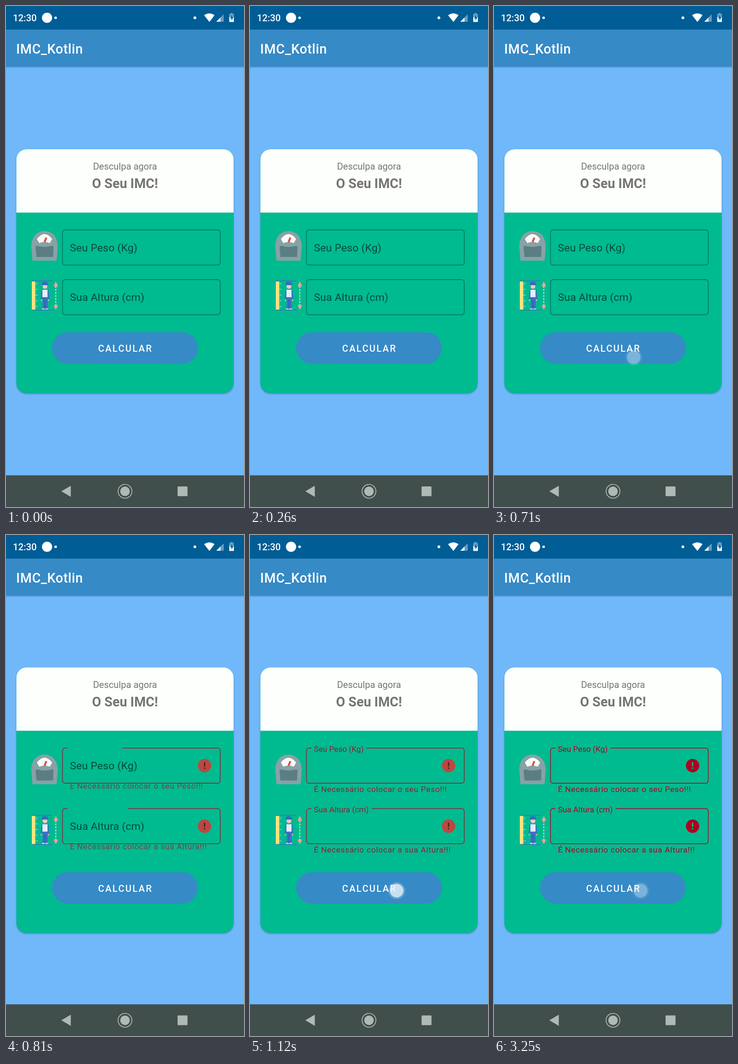
Animation, 516 px wide and 1084 px high, one loop 3350 ms. Source, as an HTML page:

```html
<!DOCTYPE html>
<html lang="pt">
<head>
<meta charset="utf-8">
<title>IMC_Kotlin</title>
<style>
  html, body { margin: 0; width: 100%; height: 100%; overflow: hidden; background: #70b8fa; }
  svg { display: block; --error: #b00020; --badge: #b00020; --mark: #00ba90; }
  svg.muted { --error: #8f2032; --badge: #bd473e; --mark: #57202a; }
  text { font-family: Roboto, sans-serif; }
  .medium { font-weight: 500; fill: #fff; }
  .body { font-size: 22.93px; letter-spacing: .2px; fill: #044a3a; }
  .small { font-size: 17.2px; fill: var(--error); }
  .caption { letter-spacing: .75px; }
  .outline { fill: none; stroke: #007158; stroke-width: 1.4; }
  .wrong .outline { stroke: var(--error); }
  #card { filter: drop-shadow(0 2px 1.5px rgba(0, 30, 60, .3)); }
</style>
</head>
<body>
<svg id="stage" width="516" height="1084" viewBox="0 0 516 1084">
  <defs>
    <linearGradient id="shade" x2="0" y2="1">
      <stop stop-color="#2d6291" stop-opacity=".45"/>
      <stop offset="1" stop-color="#2d6291" stop-opacity="0"/>
    </linearGradient>
    <radialGradient id="halo">
      <stop offset=".7" stop-color="#fff" stop-opacity=".35"/>
      <stop offset="1" stop-color="#fff" stop-opacity="0"/>
    </radialGradient>
    <clipPath id="below"><rect x="122" y="77" width="343" height="30"/></clipPath>
  </defs>

  <rect width="516" height="1084" fill="#70b8fa"/>
  <rect y="131" width="516" height="4" fill="url(#shade)"/>
  <rect y="50" width="516" height="81" fill="#368ac6"/>
  <rect width="516" height="51" fill="#005d96"/>
  <text class="medium" x="15" y="33" font-size="20.3">12:30</text>
  <text class="medium" x="22" y="103" font-size="28.67" letter-spacing=".6">IMC_Kotlin</text>
  <g fill="#fff">
    <circle cx="89" cy="25.5" r="11"/>
    <circle cx="107.5" cy="25.5" r="2.8"/>
    <circle cx="409.5" cy="25.5" r="3"/>
    <path d="M429.500 20Q441 12 452 20L441 34.500Z"/>
    <path d="M456 34L472 18V34Z" opacity=".4"/>
    <path d="M456 34L465 25V34Z"/>
    <path d="M484 17H487V15H491V17H494V25H484Z" opacity=".4"/>
    <path d="M484 24H494V34.500H484Z"/>
    <path d="M490 19L486 27H489V32L493 24H490Z" fill="#005d96"/>
  </g>

  <g id="card">
    <rect id="panel" x="22.500" width="471" rx="22" fill="#00ba90"/>
    <g class="up">
      <path d="M22.500 447V332a22 22 0 0 1 22-22h427a22 22 0 0 1 22 22V447Z" fill="#fcfffb"/>
    </g>
  </g>
  <g class="up" text-anchor="middle" fill="#757575">
    <text x="258" y="354" font-size="20.07">Desculpa agora</text>
    <text x="258" y="394" font-size="28.67" font-weight="700">O Seu IMC!</text>
  </g>

  <g id="scale">
    <path d="M59 551Q57 551 57 548L55 520C55 499 67 487 83.500 487S112 499 112 520L110 548Q110 551 108 551Z" fill="#87a2a6"/>
    <path d="M67 504Q83.500 483 100 504L95 513Q83.500 508 72 513Z" fill="#fafafa"/>
    <path d="M83.500 511L87.500 501" stroke="#e4483c" stroke-width="4"/>
    <path d="M64 521Q66 518 70 519.500Q83.500 523 97 519.500Q103 518 103 522L102 543H66Z" fill="#5a7e83"/>
  </g>

  <g id="ruler">
    <path d="M55.500 594.800H101M57 657.800H101" stroke="#456fb8" stroke-width="1.600"/>
    <rect x="56" y="596" width="7.500" height="61" fill="#fbe47e"/>
    <path d="M66 600V655" stroke="#91bbe6" stroke-width="5" stroke-dasharray="1.800 10.500"/>
    <path d="M77 615Q84 611 92 615L94 635H90L91 655H79L80 635H75Z" fill="#3d71c4"/>
    <path d="M84.500 635V655" stroke="#23539d"/>
    <path d="M79 614H90V630H79Z" fill="#e3eefa"/>
    <path d="M75.500 635H78V638H75.500ZM91 635H93.500V638H91Z" fill="#f4bdb0"/>
    <circle cx="84.500" cy="606.500" r="5.200" fill="#f4c9be"/>
    <path d="M77.500 604Q76 596 84 596.500Q92 596 91.500 604Z" fill="#376ac0"/>
    <path d="M78 655.500H84M85.500 655.500H91.500" stroke="#dbe5f1" stroke-width="2"/>
    <path d="M108 606V648" stroke="#f3d0c3" stroke-width="2" stroke-dasharray="4 2.500"/>
    <path d="M104 604L108 596L112 604V607H104ZM104 647H112V650L108 657L104 650Z" fill="#f3a096"/>
  </g>

  <g id="fields"></g>

  <g class="down">
    <rect x="100" y="706" width="316" height="68" rx="34" fill="#368ac6"/>
    <text class="medium" x="199.800" y="748" font-size="20.07" letter-spacing="2.300">CALCULAR</text>
  </g>
  <g id="touch">
    <circle r="20" fill="url(#halo)"/>
    <circle r="14.500" fill="#e4f1f8" opacity=".72"/>
  </g>

  <rect y="1015.500" width="516" height="69" fill="#414f4c"/>
  <g fill="#afbab5">
    <path d="M120 1050L140.500 1038V1062Z"/>
    <circle cx="258" cy="1050" r="10.300"/>
    <circle cx="258" cy="1050" r="15" fill="none" stroke="#afbab5" stroke-width="1.700"/>
    <rect x="372" y="1039.500" width="21.500" height="21" rx="1.500"/>
  </g>
</svg>
<script>
const LOOP = 3350, SHIFT = 23.5;
const $ = id => document.getElementById(id);
const all = selector => document.querySelectorAll(selector);

const field = (id, label, gapEnd, message) => `
  <g id="${id}">
    <rect class="outline normal" x="122.500" width="342" height="76" rx="5.500"/>
    <path class="outline error" d="M${gapEnd} 0H459a5.500 5.500 0 0 1 5.500 5.500V70.500a5.500 5.500 0 0 1-5.500 5.500
      H128a5.500 5.500 0 0 1-5.500-5.500V5.500A5.500 5.500 0 0 1 128 0H133"/>
    <text class="body hint" x="138.500" y="46">${label}</text>
    <text class="small floating" x="138.500" y="7.500">${label}</text>
    <g class="error">
      <circle cx="430.500" cy="38" r="14.400" fill="var(--badge)"/>
      <path d="M429 30.500h3v9h-3zM429 42h3v3h-3z" fill="var(--mark)"/>
      <g clip-path="url(#below)"><text class="small caption" x="138.500" y="95">${message}</text></g>
    </g>
  </g>`;

$("fields").innerHTML =
  field("weight", "Seu Peso (Kg)", 252, "É Necessário colocar o seu Peso!!!") +
  field("height", "Sua Altura (cm)", 264, "É Necessário colocar a sua Altura!!!");

const show = (selector, on) => all(selector).forEach(e => e.style.display = on ? "" : "none");
const move = (selector, y) => all(selector).forEach(e => e.setAttribute("transform", `translate(0 ${y})`));

function draw(t) {
  const wrong = t >= 810, floated = t >= 940;
  const shift = wrong ? SHIFT : 0;

  $("stage").classList.toggle("muted", t < 3150);
  $("fields").classList.toggle("wrong", wrong);
  $("panel").setAttribute("y", 310 - shift);
  $("panel").setAttribute("height", 527.5 + 2 * shift);
  move(".up", -shift);
  move(".down", shift);
  move("#scale", -shift / 2);
  move("#ruler", shift / 2);
  move("#weight", 484.5 - shift);
  move("#height", 592);

  show(".normal", !wrong);
  show(".error", wrong);
  show(".hint", !floated);
  show(".floating", floated);
  move(".caption", floated ? 0 : -7);
  all(".caption").forEach(e => e.style.opacity = floated ? 1 : .75);

  const first = t >= 610 && t < 810, second = t >= 1120;
  const fading = first ? t >= 710 : t >= 3250;
  show("#touch", first || second);
  $("touch").setAttribute("transform", first ? "translate(303 760)" : "translate(318 769.500)");
  $("touch").setAttribute("opacity", fading ? .48 : 1);
}

function tick() {
  draw(performance.now() % LOOP);
  requestAnimationFrame(tick);
}
tick();
</script>
</body>
</html>
```
